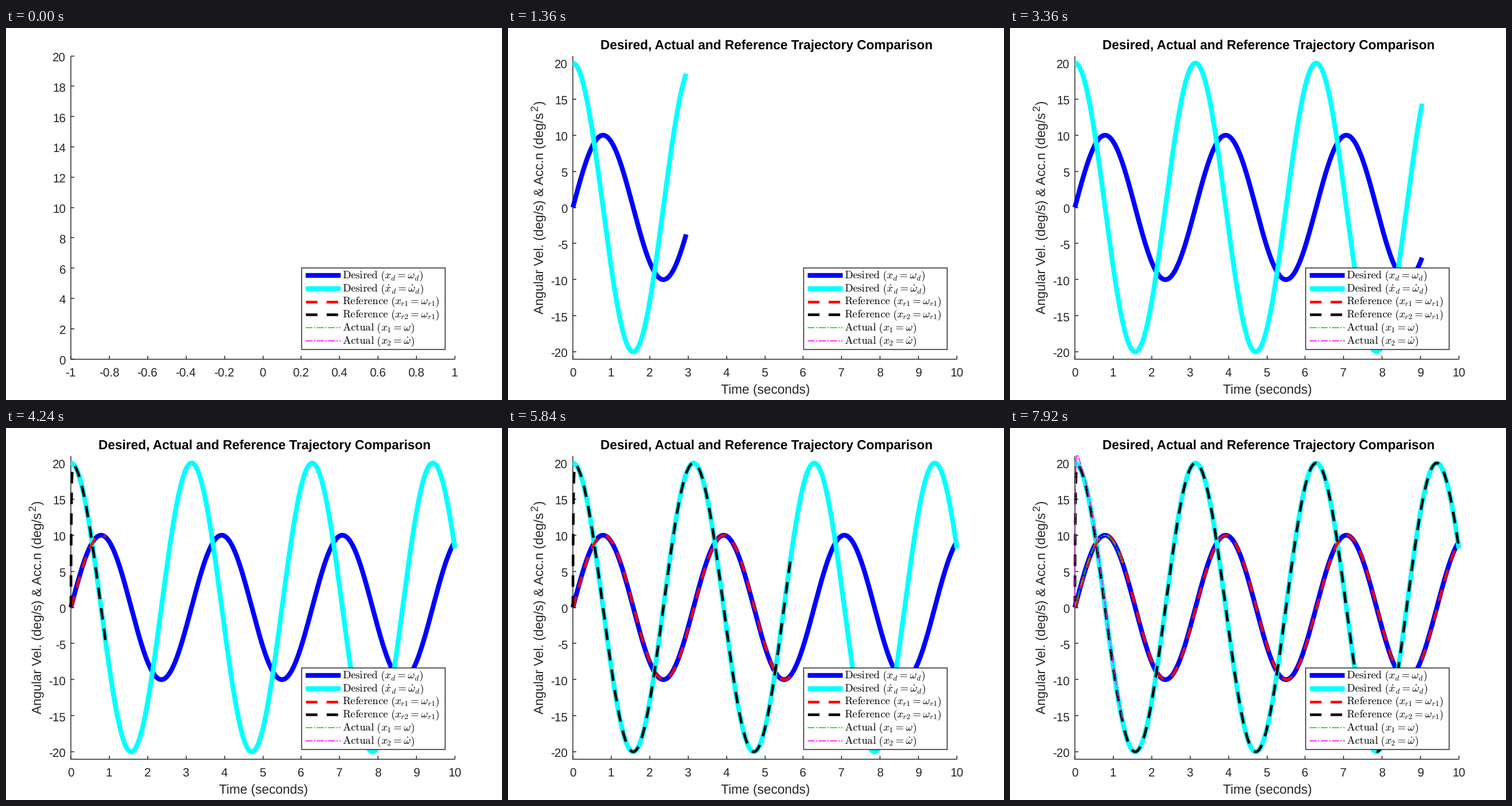
These frames come from a looping animation (864 by 648 pixels, 8 s). A matplotlib script:

```python
import numpy as np
import matplotlib.pyplot as plt
from matplotlib.animation import FuncAnimation
from matplotlib.patches import Rectangle

plt.rcParams.update({
    "font.family": "Liberation Sans",
    "mathtext.fontset": "cm",
    "text.hinting": "none",
    "lines.scale_dashes": False,
})

W, H, DPI = 864, 648, 72          # at 72 dpi one point is one pixel
FRAMES, INTERVAL = 100, 80
LEFT, RIGHT, TOP, BOTTOM = 113, 782, 48.5, 576.6
INK = "#262626"
DASH = (0, (20, 16))
DASH_DOT = (0, (12, 2.5, 2.5, 2.5))

fig = plt.figure(figsize=(W / DPI, H / DPI), dpi=DPI, facecolor="white")
ax = fig.add_axes([0, 0, 1, 1])
ax.set_xlim(0, W)
ax.set_ylim(H, 0)
ax.axis("off")


def to_x(t):
    return LEFT + (RIGHT - LEFT) * t / 10


def to_y(v):
    return (TOP + BOTTOM) / 2 - (BOTTOM - TOP) * v / 42


def segment(xs, ys, color=INK, width=1.5, style="-", z=1):
    return ax.plot(xs, ys, color=color, lw=width, ls=style, zorder=z,
                   solid_capstyle="butt", dash_capstyle="butt")[0]


def label(x, y, text, size, ha="center", color=INK, **kw):
    return ax.text(x, y, text, fontsize=size, ha=ha, va="baseline",
                   color=color, **kw)


def y_axis(values, positions):
    parts = []
    for value, y in zip(values, positions):
        parts.append(segment([LEFT, LEFT + 6], [y, y]))
        parts.append(label(104, y + 9.2, f"{value:g}", 20.57, "right"))
    return parts


def x_labels(values):
    return [label(x - 0.5, 607, f"{v:g}", 20.57)
            for v, x in zip(values, to_x(np.arange(11)))]


# Axes shared by both states
segment([LEFT, LEFT, RIGHT], [TOP, BOTTOM, BOTTOM])
for x in to_x(np.arange(11)):
    segment([x, x], [BOTTOM - 6, BOTTOM])

# Empty default axes
empty = y_axis(range(0, 21, 2), np.linspace(BOTTOM, TOP, 11))
empty += x_labels([round(0.2 * k - 1, 1) + 0.0 for k in range(11)])

# Labelled axes
y_values = np.arange(-20, 21, 5)
labelled = y_axis(y_values, to_y(y_values)) + x_labels(range(11))
labelled += [
    label(450, 37, "Desired, Actual and Reference Trajectory Comparison",
          22.63, weight="bold", color="black"),
    label(448.5, 637, "Time (seconds)", 22.63),
]
vertical = dict(ha="left", rotation=90, rotation_mode="anchor")
labelled += [
    label(62.5, 498.5, "Angular Vel. (deg/s) & Acc.n (deg/s", 22.63,
          **vertical),
    label(52.5, 145, "2", 18.1, **vertical),
    label(62.5, 134.5, ")", 22.63, **vertical),
]


# Signals
def rise(t):
    return 1 - np.exp(-80 * t)


def desired_vel(t):
    return 10 * np.sin(2 * t)


def desired_acc(t):
    return 20 * np.cos(2 * t)


def reference_vel(t):
    return desired_vel(t) - 0.25 * rise(t) * np.cos(2 * t)


def reference_acc(t):
    return desired_acc(t) * rise(t)


def actual_vel(t):
    return desired_vel(t)


def actual_acc(t):
    return reference_acc(t) + rise(t) * (2.3 * np.exp(-8 * t)
                                         + 0.5 * np.sin(2 * t))


# signal, colour, width, dash, phase, legend text
SERIES = [
    (desired_vel, "#0000ff", 8.3, "-", 0, r"Desired}\ (x_d=\omega_d)"),
    (desired_acc, "#00ffff", 8.3, "-", 0,
     r"Desired}\ (\dot{x}_d=\dot{\omega}_d)"),
    (reference_vel, "#ff0000", 4.6, DASH, 1,
     r"Reference}\ (x_{r1}=\omega_{r1})"),
    (reference_acc, "#000000", 4.6, DASH, 1,
     r"Reference}\ (x_{r2}=\omega_{r1})"),
    (actual_vel, "#00e000", 1.6, DASH_DOT, 2, r"Actual}\ (x_1=\omega)"),
    (actual_acc, "#ff00ff", 1.6, DASH_DOT, 2,
     r"Actual}\ (x_2=\dot{\omega})"),
]

ax.add_patch(Rectangle((514.5, 417.5), 250, 142, fc="white", ec=INK,
                       lw=1.5, zorder=20))
curves = []
for row, (signal, color, width, style, phase, text) in enumerate(SERIES):
    y = 430.8 + 22.85 * row
    segment([521.5, 583], [y, y], color, width, style, 21)
    label(586, y + 5.3, r"$\mathrm{" + text + "$", 18.7, "left",
          color="black", zorder=21)
    curves.append(segment([], [], color, width, style, 5 + row))

PHASE_START = (1, 45.6, 90.2)


def reached_time(age):
    """Solver time shown after `age` frames; the first steps are tiny."""
    return np.interp(age, [0, 3, 5, 8.8, 16, 29, 41, 44.6],
                     [0, 0.04, 0.34, 1.24, 2.95, 6.05, 9.04, 10])


def update(frame):
    started = frame > 0
    for part in empty:
        part.set_visible(not started)
    for part in labelled:
        part.set_visible(started)
    for curve, (signal, *_, phase, _text) in zip(curves, SERIES):
        end = reached_time(frame - PHASE_START[phase])
        if end > 0:
            t = np.linspace(0, 1, 1200) ** 1.5 * end
            curve.set_data(to_x(t), to_y(signal(t)))
        else:
            curve.set_data([], [])
    return curves


anim = FuncAnimation(fig, update, frames=FRAMES, interval=INTERVAL,
                     repeat=True, repeat_delay=0, blit=False)
plt.show()
```
